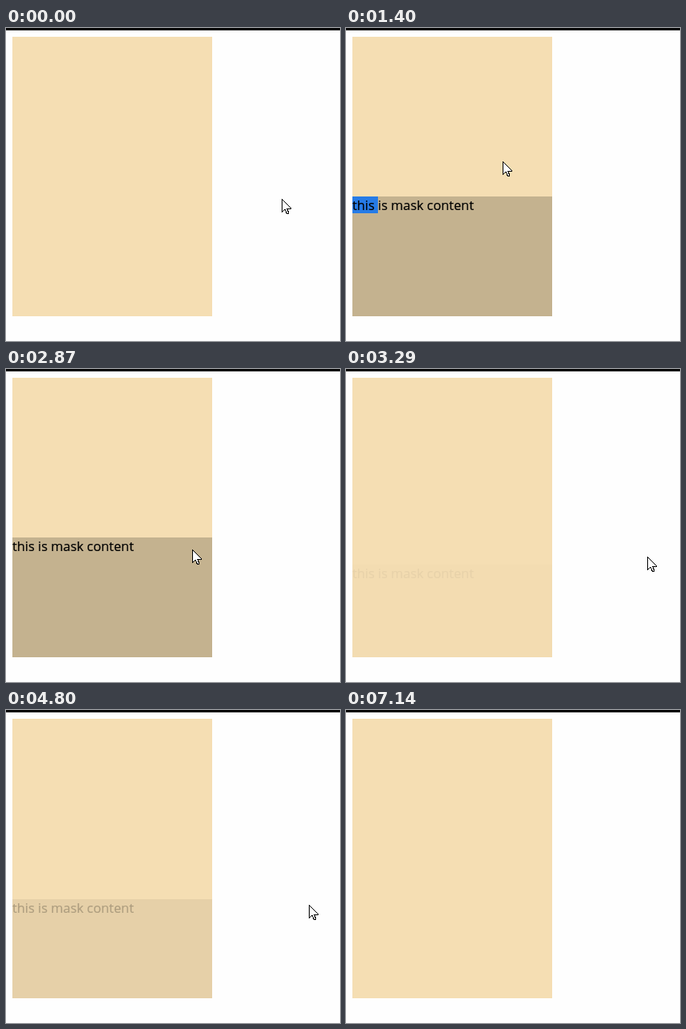
An HTML page that plays this animation: 418 by 392 pixels, repeating every 7260 ms.

```html
<!DOCTYPE html>
<html lang="en">
<head>
<meta charset="utf-8">
<title>Hover mask</title>
<style>
  html, body { margin: 0; width: 100%; height: 100%; overflow: hidden; background: #fefefe; }
  svg { display: block; }
  text { font: 16.4px "Open Sans", "Noto Sans", sans-serif; stroke: #000; stroke-width: .2; }
</style>
</head>
<body>
<svg width="418" height="392">
  <rect width="418" height="3"/>
  <svg x="8" y="11" width="250" height="350" overflow="hidden">
    <rect width="250" height="350" fill="#f5deb3"/>
    <g id="mask">
      <rect width="250" height="150" fill-opacity=".2"/>
      <rect id="selection" width="32" height="21" fill="#267be6"/>
      <text y="17">this is mask content</text>
    </g>
  </svg>
  <path id="cursor" d="M.5 .5V16.5L4 13L6.5 18.5H8L8.5 17L7 12.5H11.5V11.5Z"
        fill="#fff" stroke="#000" shape-rendering="crispEdges"/>
</svg>
<script>
const LOOP = 7260, FADE = 500, SLIDE = 36, MASK_TOP = 200, CARD_RIGHT = 258;
const DESELECT = 1900, CURSOR_GONE = 7140;
const mask = document.getElementById("mask");
const selection = document.getElementById("selection");
const cursor = document.getElementById("cursor");

// Turning points of the pointer; it eases from each one to the next.
const path = [
  { t: 120, x: 345, y: 214 }, { t: 660, x: 196, y: 167 }, { t: 1400, x: 196, y: 167 },
  { t: 1820, x: 335, y: 222 }, { t: 2450, x: 140, y: 252 }, { t: 2720, x: 140, y: 252 },
  { t: 2870, x: 233, y: 226 }, { t: 3290, x: 377, y: 235 }, { t: 3660, x: 377, y: 235 },
  { t: 4140, x: 156, y: 132 }, { t: 4520, x: 172, y: 126 }, { t: 4800, x: 379, y: 244 },
  { t: 4950, x: 389, y: 282 }, { t: 5910, x: 144, y: 258 }, { t: 6360, x: 144, y: 264 },
  { t: 6990, x: 358, y: 309 }
];

// CSS "ease": cubic-bezier(.25, .1, .25, 1), solved by bisection.
function ease(x) {
  if (x <= 0) return 0;
  if (x >= 1) return 1;
  let low = 0, high = 1, s = .5;
  for (let i = 0; i < 20; i++) {
    s = (low + high) / 2;
    if (.75 * s * (1 - s) + s ** 3 < x) low = s; else high = s;
  }
  return .3 * s * (1 - s) ** 2 + 3 * s * s * (1 - s) + s ** 3;
}

function pointerAt(t) {
  const i = Math.max(1, path.findIndex(p => p.t > t));
  const from = t < path.at(-1).t ? path[i - 1] : path.at(-1);
  const to = t < path.at(-1).t ? path[i] : from;
  const k = from === to ? 0 : ease((t - from.t) / (to.t - from.t));
  return {
    x: Math.round(from.x + (to.x - from.x) * k),
    y: Math.round(from.y + (to.y - from.y) * k)
  };
}

// Times at which the pointer enters or leaves the card, alternately.
const crossings = [];
for (let t = 0, inside = false; t < LOOP; t++) {
  if (pointerAt(t).x < CARD_RIGHT !== inside) {
    inside = !inside;
    crossings.push(t);
  }
}

function maskShown(t) {
  const passed = crossings.filter(c => c <= t);
  if (!passed.length) return 0;
  const progress = ease((t - passed.at(-1)) / FADE);
  return passed.length % 2 ? progress : 1 - progress;
}

function draw(t) {
  const shown = maskShown(t), { x, y } = pointerAt(t);
  mask.setAttribute("opacity", shown);
  mask.setAttribute("transform", `translate(0 ${MASK_TOP + Math.round(SLIDE * (1 - shown))})`);
  selection.setAttribute("visibility", t < DESELECT ? "visible" : "hidden");
  cursor.setAttribute("visibility", t < CURSOR_GONE ? "visible" : "hidden");
  cursor.setAttribute("transform", `translate(${x} ${y})`);
}

const start = performance.now();
function tick() {
  draw((performance.now() - start) % LOOP);
  requestAnimationFrame(tick);
}
tick();
</script>
</body>
</html>
```
